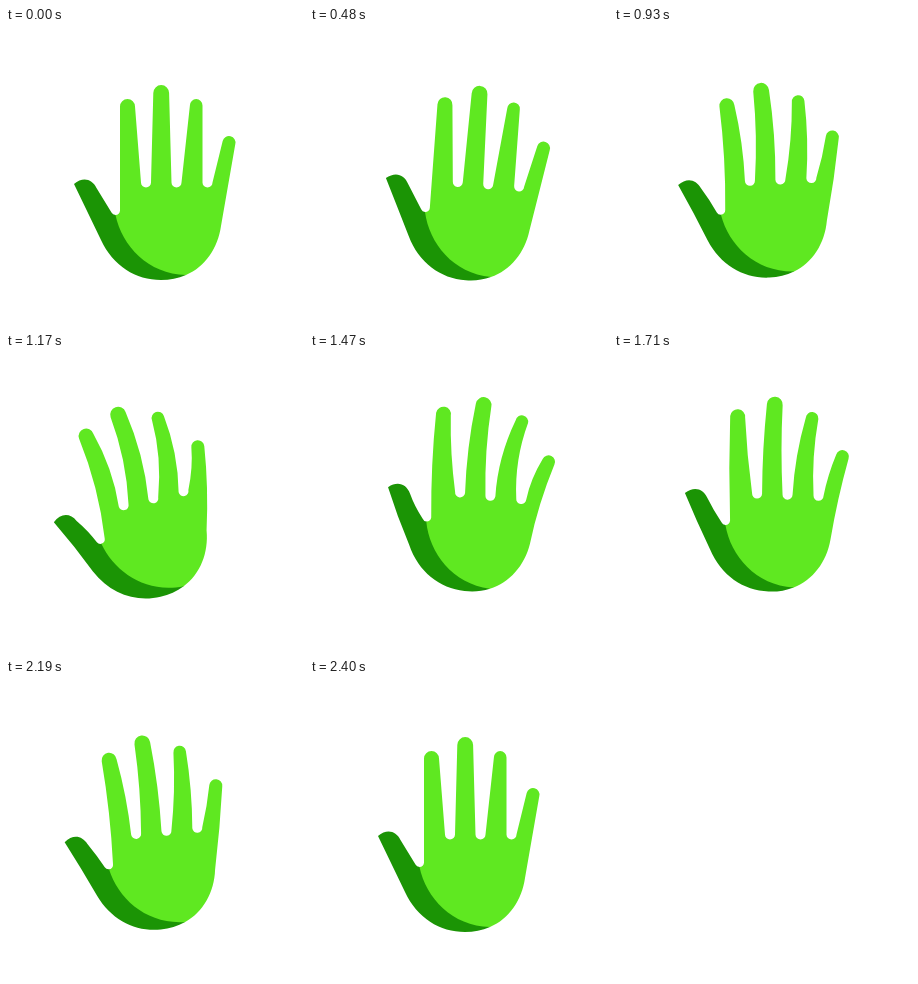
Animation, 298 px wide and 298 px high, one loop 2700 ms. Source, as an HTML page with a canvas:

```html
<!DOCTYPE html>
<html lang="en">
<head>
<meta charset="utf-8">
<title>Waving hand</title>
<style>
  html, body { margin: 0; width: 100%; height: 100%; overflow: hidden; background: #fff; }
  canvas { display: block; width: 298px; height: 298px; }
</style>
</head>
<body>
<canvas id="stage"></canvas>
<script>
const SIZE = 298, LOOP = 2700, TICK = 30;
const LIGHT = '#5fe821', DARK = '#1b9405';
const PIVOT = { x: 152, y: 260 };
const DRIFT = 1.4;

const canvas = document.getElementById('stage');
const ctx = canvas.getContext('2d');
const dpr = window.devicePixelRatio || 1;
canvas.width = canvas.height = Math.round(SIZE * dpr);

// Keys are [time, value] pairs
const TILT = [[300, 0], [650, 8], [690, 8], [1170, -13.2], [1560, 8.5], [1950, -13.2], [2400, 0]];
const BEND = [[690, 0], [1170, 1], [1560, -1.2], [1950, 1], [2400, 0]];
const LIFT = [[720, 0], [1560, -15.8], [2400, 0]];

// Tip centre, radius and lean; base edges; sideways shift and bow when bent left / right
const FINGERS = [
  { x: 121.5, y: 78.5, r: 7.5, lean: 0, from: [114, 182.5], to: [135, 154.5], shift: [-2.2, -6.7], bow: [3.5, 1.5] },
  { x: 155.2, y: 65, r: 7.9, lean: 0, from: [145, 154.5], to: [165.5, 154.5], shift: [0.1, -1.3], bow: [3.5, 2] },
  { x: 190.2, y: 77.4, r: 6.3, lean: 0, from: [175.5, 154.5], to: [196.5, 154.5], shift: [3.1, 3.7], bow: [3.5, 4] },
  { x: 223, y: 114.5, r: 6.5, lean: 0.24, from: [206.5, 154.5], to: [215, 198], shift: [2.6, 1.7], bow: [1.6, 2] }
];

const quad = u => u < 0.5 ? 2 * u * u : 1 - 2 * (1 - u) * (1 - u);
const sine = u => (1 - Math.cos(Math.PI * u)) / 2;

function sample(keys, t, ease) {
  if (t <= keys[0][0]) return keys[0][1];
  for (let i = 1; i < keys.length; i++) {
    const [t0, a] = keys[i - 1], [t1, b] = keys[i];
    if (t < t1) return a + (b - a) * ease((t - t0) / (t1 - t0));
  }
  return keys[keys.length - 1][1];
}

// Edge from the current point to (x, y), pushed sideways by bow at its middle
function edge(x0, y0, x, y, bow) {
  ctx.quadraticCurveTo((x0 + x) / 2 + 2 * bow, (y0 + y) / 2, x, y);
}

function finger(f, bend) {
  const side = bend > 0 ? 0 : 1;
  const x = f.x + f.shift[side] * Math.abs(bend), y = f.y;
  const bow = f.bow[side] * bend;
  const lean = f.lean - 0.1 * bend;
  const dx = f.r * Math.cos(lean), dy = f.r * Math.sin(lean);
  edge(...f.from, x - dx, y - dy, bow);
  ctx.arc(x, y, f.r, Math.PI + lean, 2 * Math.PI + lean);
  edge(x + dx, y + dy, ...f.to, bow);
}

function thumb(bend) {
  const tx = 0.2 * bend, ty = -bend;
  ctx.beginPath();
  ctx.moveTo(109.5, 187);
  ctx.arc(109.5, 182.5, 4.5, Math.PI / 2, Math.PI * 0.85);
  edge(105.5, 184.5, 90.5 + tx, 160 + ty, bend);
  ctx.bezierCurveTo(86 + tx, 151 + ty, 77 + tx, 148.5 + ty, 68 + tx, 156 + ty);
  edge(68 + tx, 156 + ty, 95, 212, 0.8 * bend);
  ctx.bezierCurveTo(107, 238, 130, 252, 155, 252);
  ctx.bezierCurveTo(164, 252, 172, 250.5, 180, 247);
  // tucked under the palm
  ctx.lineTo(150, 212);
  ctx.lineTo(116, 189);
  ctx.closePath();
  ctx.fillStyle = DARK;
  ctx.fill();
}

function palm(bend) {
  ctx.beginPath();
  ctx.moveTo(109.5, 187);
  ctx.arc(109.5, 182.5, 4.5, Math.PI / 2, 0, true);
  FINGERS.forEach((f, i) => {
    finger(f, bend);
    if (i < 3) ctx.arc(f.to[0] + 5, f.to[1], 5, Math.PI, 0, true);
  });
  ctx.bezierCurveTo(212, 220, 199, 239, 180, 247);
  ctx.bezierCurveTo(142, 246, 116, 218, 109.5, 187);
  ctx.closePath();
  ctx.fillStyle = LIGHT;
  ctx.fill();
}

function draw(t) {
  const bend = sample(BEND, t, quad);
  ctx.setTransform(dpr, 0, 0, dpr, 0, 0);
  ctx.fillStyle = '#fff';
  ctx.fillRect(0, 0, SIZE, SIZE);
  ctx.translate(PIVOT.x + DRIFT * bend, PIVOT.y + sample(LIFT, t, sine));
  ctx.rotate(sample(TILT, t, quad) * Math.PI / 180);
  ctx.translate(-PIVOT.x, -PIVOT.y);
  thumb(bend);
  palm(bend);
}

const start = performance.now();
function frame() {
  const t = (performance.now() - start) % LOOP;
  draw(Math.floor(t / TICK) * TICK);
  requestAnimationFrame(frame);
}
frame();
</script>
</body>
</html>
```
